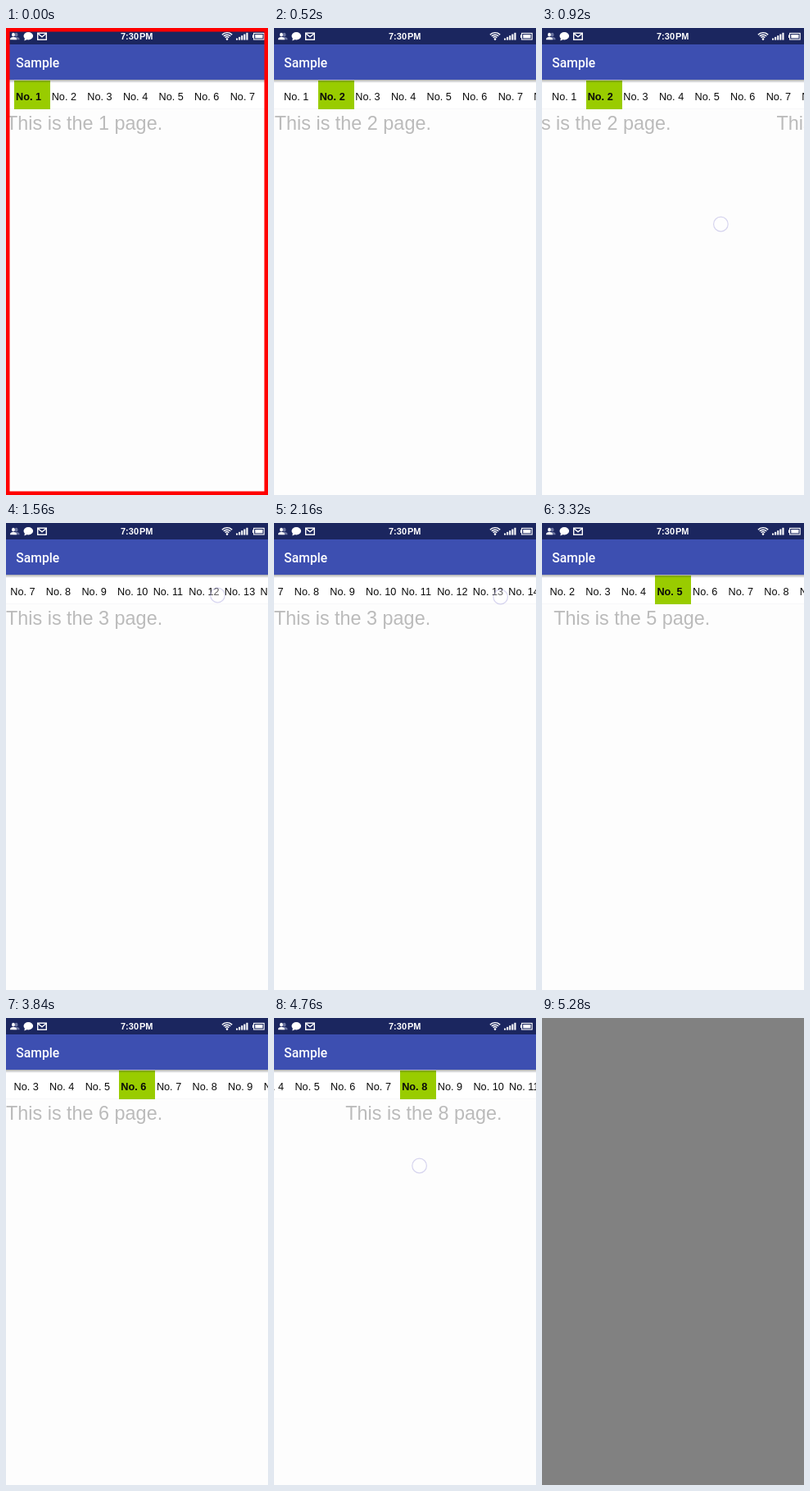
Write an HTML page with a canvas that moves like this. It is 320 px wide and 569 px high and loops after 5.36 s.

```html
<!DOCTYPE html>
<html lang="en">
<head>
<meta charset="utf-8">
<title>Sample</title>
<style>
  html, body { margin: 0; width: 100%; height: 100%; overflow: hidden; background: #fdfdfd; }
  canvas { display: block; width: 320px; height: 569px; }
</style>
</head>
<body>
<canvas id="stage"></canvas>
<script>
const W = 320, H = 569, LOOP = 5360, STEP = 40;
const TAB_W = 43.6, TAB_X = 10, TABS = 20;
const SANS = '"Liberation Sans", Arial, sans-serif';
const canvas = document.getElementById('stage');
const ctx = canvas.getContext('2d');
const dpr = window.devicePixelRatio || 1;
canvas.width = W * dpr;
canvas.height = H * dpr;
ctx.scale(dpr, dpr);

// Progress 0..1 from start over ms, and its eased-out form
const ramp = (t, start, ms) => Math.min(1, Math.max(0, (t - start) / ms));
const easeOut = (u, power) => 1 - Math.pow(1 - u, power);

const tabCentre = n => TAB_X + (n - 0.5) * TAB_W;
const barFor = n => Math.max(0, tabCentre(n) - W / 2);

// Selects page n and slides the tab bar to centre its tab
function select(s, n, at) {
  s.bar += (barFor(n) - barFor(s.target)) * easeOut(ramp(s.t, at, 230), 5);
  s.target = n;
  if (s.t >= at) s.selected = n;
}

// Drags to the next page, lets go part of the way, then it settles
function swipe(start, x, y) {
  const ms = 180, share = 0.42;
  return s => {
    const drag = share * ramp(s.t, start, ms) ** 2;
    const settle = easeOut(ramp(s.t, start + ms, 300), 5);
    s.page += drag + (1 - share) * settle;
    select(s, s.target + 1, start + ms);
    if (s.t >= start && s.t < start + ms + 60) s.finger = [x - drag * W, y];
  };
}

// Drags the tab bar by dx, then it coasts on
function flick(start, x, dx, y) {
  const ms = 240;
  return s => {
    const moved = dx * ramp(s.t, start, ms);
    s.bar -= moved + 0.4 * dx * easeOut(ramp(s.t, start + ms, 300), 3);
    if (s.t >= start && s.t < start + ms) s.finger = [x + moved, y];
  };
}

function tap(at, n) {
  return s => {
    const delta = n - s.target;
    if (Math.abs(s.t - at) <= 40) s.finger = [tabCentre(n) - s.bar, 86];
    s.page += delta * easeOut(ramp(s.t, at, (delta + 1) * 100), 5);
    select(s, n, at);
  };
}

const gestures = [
  swipe(140, 255, 240),
  swipe(830, 252, 239),
  flick(1260, 285, -215, 88),
  flick(1540, 270, -138, 88),
  flick(1960, 75, 242, 90),
  flick(2536, 107, 111, 95),
  tap(3160, 5),
  tap(3640, 6),
  swipe(4280, 280, 180),
  swipe(4538, 312, 180)
];

function stateAt(t) {
  const s = { t, page: 1, target: 1, selected: 1, bar: 0, finger: null };
  gestures.forEach(apply => apply(s));
  return s;
}

function rect(color, x, y, w, h) {
  ctx.fillStyle = color;
  ctx.fillRect(x, y, w, h);
}

function text(str, x, y, font, color, align = 'left') {
  ctx.font = font;
  ctx.fillStyle = color;
  ctx.textAlign = align;
  ctx.fillText(str, x, y);
}

function disc(x, y, rx, ry = rx) {
  ctx.beginPath();
  ctx.ellipse(x, y, rx, ry, 0, 0, Math.PI * 2);
  ctx.fill();
}

function person(x, color) {
  ctx.fillStyle = color;
  disc(x, 8.2, 1.9, 2.4);
  ctx.beginPath();
  ctx.ellipse(x, 14.2, 4, 3.2, 0, Math.PI, 0);
  ctx.fill();
}

function statusBar() {
  rect('#1b265f', 0, 0, W, 20);
  person(12.6, '#6c75a0');
  person(9, '#fff');

  ctx.fillStyle = '#fff';
  disc(27.3, 9.8, 5.8, 4.7);
  ctx.beginPath();
  ctx.moveTo(23, 12);
  ctx.lineTo(22.4, 15.6);
  ctx.lineTo(27, 13.6);
  ctx.fill();

  ctx.strokeStyle = '#fff';
  ctx.lineWidth = 1.4;
  ctx.strokeRect(38.7, 6.2, 10.6, 8);
  ctx.beginPath();
  ctx.moveTo(39, 6.8);
  ctx.lineTo(44, 10.8);
  ctx.lineTo(49, 6.8);
  ctx.stroke();

  const clock = 'bold 11px ' + SANS;
  text('7:30', 162, 14, clock, '#fff', 'right');
  text('PM', 163, 14, clock, '#fff');

  for (let r = 3.2; r < 9; r += 2.6) {
    ctx.beginPath();
    ctx.arc(270, 14, r, -Math.PI * 0.76, -Math.PI * 0.24);
    ctx.stroke();
  }
  disc(270, 13.6, 1.3);

  for (let i = 0; i < 5; i++) {
    const h = 2 + i * 1.7;
    rect('#fff', 281 + i * 3.1, 14.6 - h, 2.1, h);
  }

  ctx.lineWidth = 1.1;
  ctx.strokeRect(302.6, 6.4, 12.6, 7.6);
  rect('#fff', 304.3, 8, 9.2, 4.4);
  rect('#fff', 301, 8.4, 1.4, 3.6);
}

function toolbar() {
  const shade = ctx.createLinearGradient(0, 63, 0, 67);
  shade.addColorStop(0, 'rgba(0,0,0,.32)');
  shade.addColorStop(1, 'rgba(0,0,0,0)');
  rect(shade, 0, 63, W, 4);
  rect('#3d4fb1', 0, 20, W, 43);
  text('Sample', 12.3, 48.3, '500 15.7px Roboto, sans-serif', '#fff');
}

function pages(pos) {
  for (let n = Math.floor(pos); n <= Math.ceil(pos); n++) {
    text(`This is the ${n} page.`, (n - pos) * W, 124, '23.4px ' + SANS, '#bbb');
  }
}

function tabs(scroll, selected) {
  rect('#fff', 0, 63, W, 36);
  rect('#f7f7f9', 0, 98, W, 1);
  for (let n = 1; n <= TABS; n++) {
    const x = tabCentre(n) - TAB_W / 2 - scroll;
    const active = n === selected;
    if (active) rect('#99cc00', Math.round(x), 64, 44, 35);
    text('No. ' + n, x + 2.1, 88, (active ? 'bold ' : '') + '12.7px ' + SANS, '#0a0a0a');
  }
}

function pointer(x, y) {
  ctx.fillStyle = 'rgba(255,255,255,.35)';
  disc(x, y, 9);
  ctx.strokeStyle = 'rgba(125,120,205,.3)';
  ctx.lineWidth = 1.2;
  ctx.beginPath();
  ctx.arc(x, y, 8.8, 0, Math.PI * 2);
  ctx.stroke();
}

function draw(t) {
  if (t >= 5240) {
    rect('#818181', 0, 0, W, H);
    return;
  }
  const s = stateAt(t);
  rect('#fdfdfd', 0, 0, W, H);
  pages(s.page);
  tabs(s.bar, s.selected);
  toolbar();
  statusBar();
  if (s.finger) pointer(...s.finger);
  if (t < 80) {
    ctx.strokeStyle = '#f00';
    ctx.lineWidth = 9;
    ctx.strokeRect(0, 0, W, H);
  }
}

const start = performance.now();
function tick() {
  const t = (performance.now() - start) % LOOP;
  draw(Math.floor(t / STEP) * STEP);
  requestAnimationFrame(tick);
}
tick();
</script>
</body>
</html>
```
